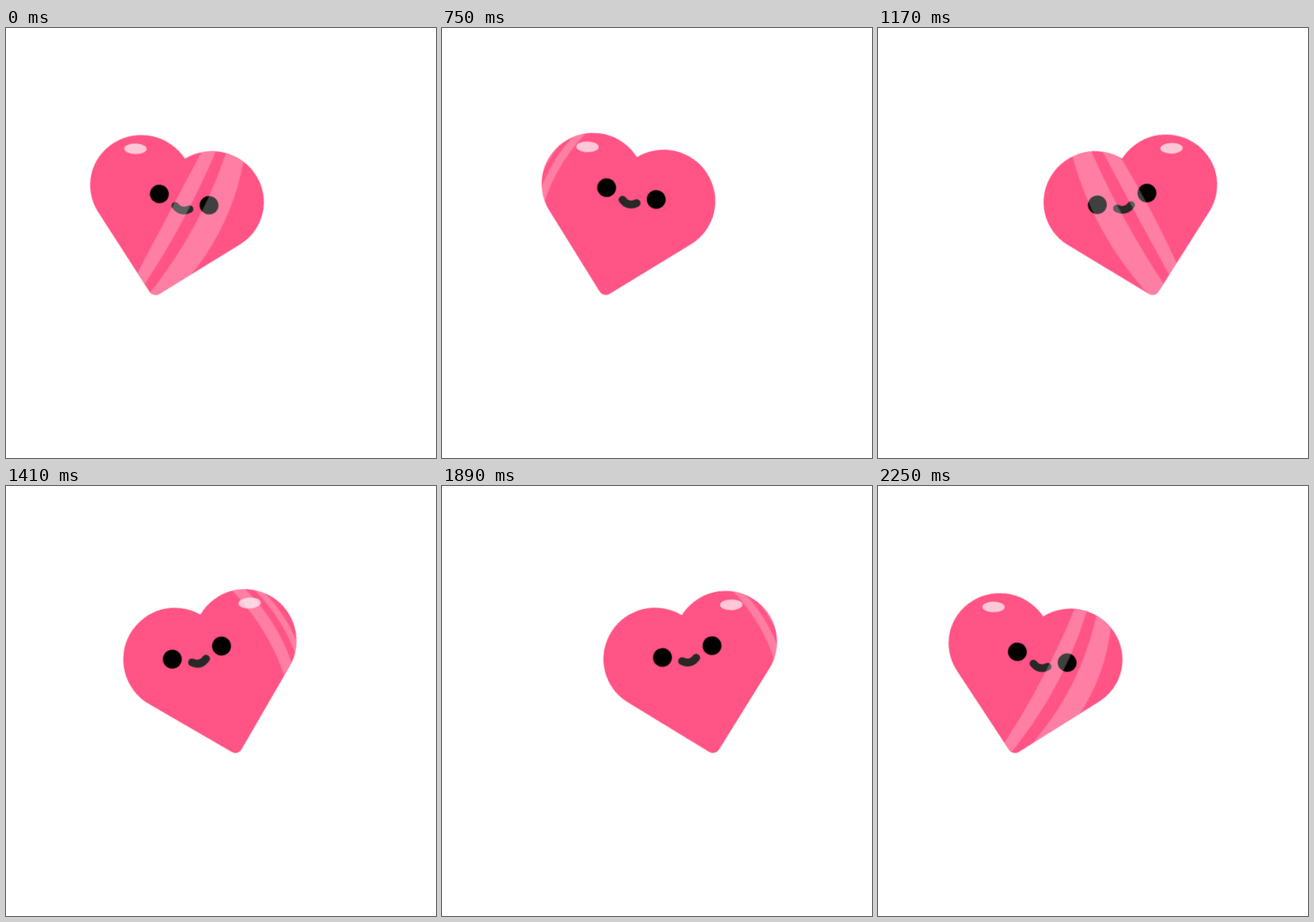
Write an HTML page without scripts that moves like this. It is 500 px wide and 500 px high and loops after 2.28 s.

```html
<!DOCTYPE html>
<html lang="en">
<head>
<meta charset="utf-8">
<title>Swinging hearts</title>
<style>
  html, body { margin: 0; width: 100%; height: 100%; overflow: hidden; background: #fff; }
  svg { display: block; width: 100vw; height: 100vh; }

  .first  { --delay: -330ms;  --reach: 1; }
  .second { --delay: -1470ms; --reach: 1.12; }

  .swing, .squash, .face, .shine {
    animation: 2280ms linear var(--delay) infinite;
  }
  .swing  { animation-name: swing; }
  .squash { animation-name: squash; }
  .face   { animation-name: look; }
  .shine  { animation-name: sweep; }

  /* Slide in, hang for a moment, rush back out */
  @keyframes swing {
    0% {
      transform: translate(calc(233px - 365px * var(--reach)), 313.5px) rotate(2deg);
      animation-timing-function: cubic-bezier(.333, 1, .667, 1);
    }
    32.46% {
      transform: translate(233px, 313.5px) rotate(15deg);
      animation-timing-function: cubic-bezier(.333, 0, .667, .333);
    }
    47.37% {
      transform: translate(calc(233px - 45px * var(--reach)), 313.5px) rotate(13.4deg);
      animation-timing-function: cubic-bezier(.333, .1, .667, .208);
    }
    62.06%, 100% {
      transform: translate(calc(233px - 365px * var(--reach)), 313.5px) rotate(2deg);
    }
  }

  @keyframes squash {
    0%, 14.47%   { transform: scaleY(.977); }
    26.32%, 36%  { transform: scaleY(1); }
    47.37%       { transform: scaleY(.99); }
    57.89%, 100% { transform: scaleY(.98); }
  }

  @keyframes look {
    0%     { transform: translate(3px, -122.5px); }
    14.47% { transform: translate(9.7px, -121.8px); animation-timing-function: ease-out; }
    26.32% {
      transform: translate(15.3px, -128px);
      animation-timing-function: cubic-bezier(.333, 0, .667, .333);
    }
    47.37% { transform: translate(3.7px, -126.5px); }
    57.89% { transform: translate(-8.9px, -124.5px); }
    62.06%, 100% { transform: translate(-12px, -124px); }
  }

  /* Two bands bounded by meridians of a turning ball */
  @keyframes sweep {
    0%, 64%, 100% {
      d: path("M336-128Q784-8 336 112H345Q805-8 345-128Z M354-128Q826-8 354 112H366Q854-8 366-128Z");
    }
    7.89%, 61.8% {
      d: path("M246-128Q574-8 246 112H279Q651-8 279-128Z M306-128Q714-8 306 112H336Q784-8 336-128Z");
    }
    13.16%, 57.89% {
      d: path("M57-128Q133-8 57 112H111Q259-8 111-128Z M159-128Q371-8 159 112H234Q546-8 234-128Z");
    }
    14.47% {
      d: path("M0-128Q0-8 0 112H54Q126-8 54-128Z M99-128Q231-8 99 112H186Q434-8 186-128Z");
    }
    20.39%, 52.63% {
      d: path("M-189-128Q-441-8-189 112H-147Q-343-8-147-128Z M-108-128Q-252-8-108 112H-21Q-49-8-21-128Z");
    }
    26.32% {
      d: path("M-291-128Q-679-8-291 112H-270Q-630-8-270-128Z M-246-128Q-574-8-246 112H-204Q-476-8-204-128Z");
    }
    34.2% {
      d: path("M-360-128Q-840-8-360 112H-351Q-819-8-351-128Z M-342-128Q-798-8-342 112H-330Q-770-8-330-128Z");
    }
    47.37% {
      d: path("M-324-128Q-756-8-324 112H-309Q-721-8-309-128Z M-291-128Q-679-8-291 112H-264Q-616-8-264-128Z");
    }
  }
</style>
</head>
<body>
<svg viewBox="0 0 500 500">
  <defs>
    <path id="outline" d="M-5.7-5.7L-84.9-84.9A60 60 0 0 1 0-169.7A60 60 0 0 1 84.9-84.9L5.7-5.7A8 8 0 0 1-5.7-5.7Z"/>
    <clipPath id="inside"><use href="#outline"/></clipPath>
    <g id="body">
      <use href="#outline" fill="#ff5485"/>
      <ellipse rx="13" ry="6.3" transform="translate(-58.7 -168) rotate(-12)" fill="#fff" fill-opacity=".68"/>
    </g>
    <g id="features">
      <circle cx="-29.6" r="11"/>
      <circle cx="29.6" r="11"/>
      <path d="M-8.5 9.5Q0 16.5 8.5 9.5" fill="none" stroke="#282828" stroke-width="9" stroke-linecap="round"/>
    </g>
  </defs>

  <g class="first">
    <g class="swing">
      <g class="squash">
        <use href="#body"/>
        <g class="face"><use href="#features"/></g>
        <g clip-path="url(#inside)">
          <path class="shine" transform="translate(-4 -100) rotate(14.8) scale(.2 1)" fill="#fff" fill-opacity=".25"/>
        </g>
      </g>
    </g>
  </g>

  <g class="second" transform="matrix(-1 0 0 1 500 0)">
    <g class="swing">
      <g class="squash">
        <use href="#body"/>
        <g class="face"><use href="#features"/></g>
        <g clip-path="url(#inside)">
          <path class="shine" transform="translate(-4 -100) rotate(14.8) scale(.2 1)" fill="#fff" fill-opacity=".25"/>
        </g>
      </g>
    </g>
  </g>
</svg>
</body>
</html>
```
